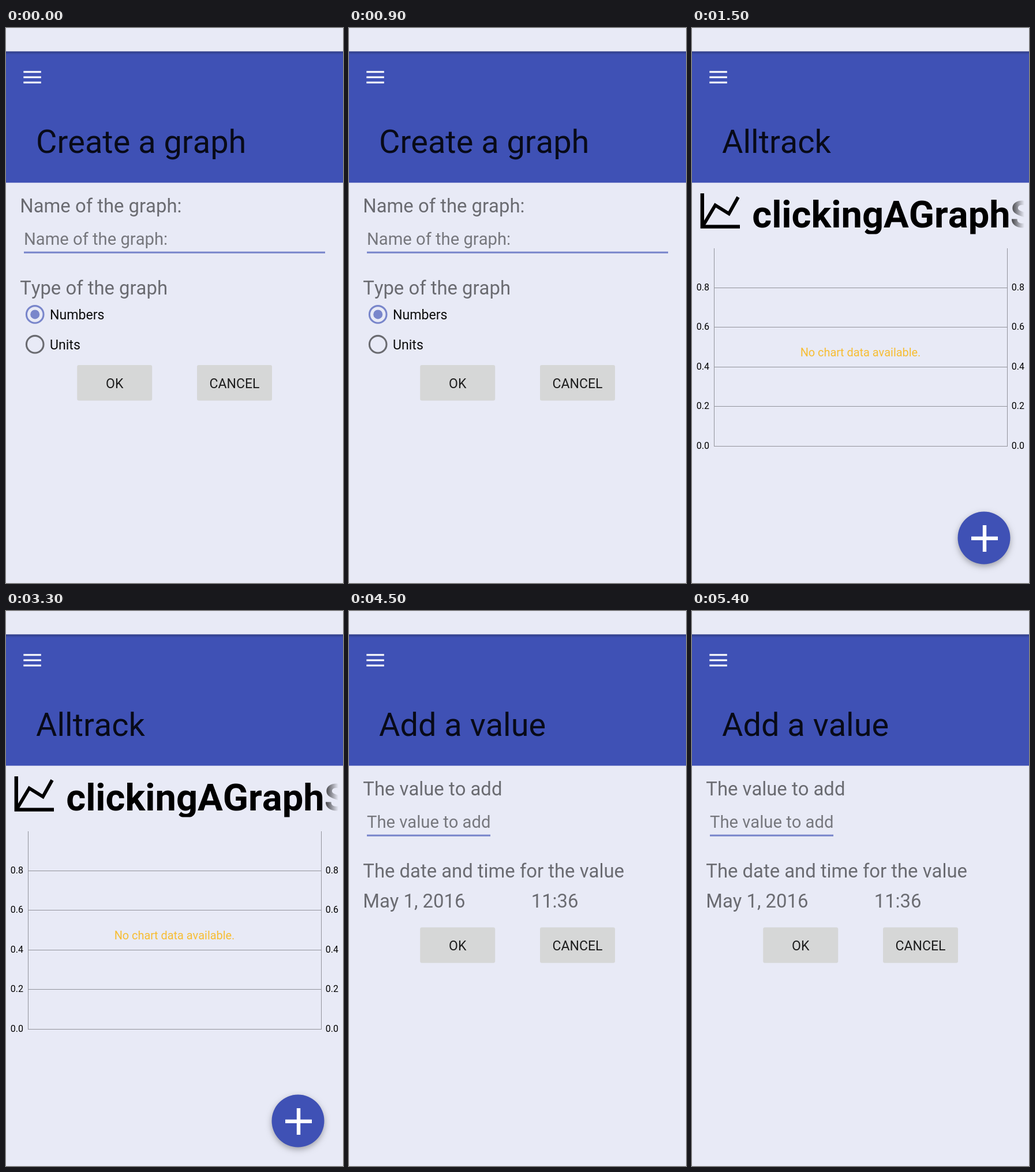
These frames come from a looping animation (584x960 px, 6 s). An HTML page with a canvas:

```html
<!DOCTYPE html>
<html lang="en">
<head>
<meta charset="utf-8">
<title>Graph tracker</title>
<style>
  html, body { margin: 0; width: 584px; height: 960px; overflow: hidden; background: #e8eaf6; }
  canvas { display: block; }
</style>
</head>
<body>
<canvas id="stage" width="584" height="960"></canvas>
<script>
const ctx = document.getElementById('stage').getContext('2d');
const LOOP = 6000;
const BACKGROUND = '#e8eaf6', PRIMARY = '#3f51b5', ACCENT = '#7986cb';
const STRONG = 'rgba(0,0,0,.87)', MUTED = 'rgba(0,0,0,.54)', HINT = 'rgba(0,0,0,.49)';

function rect(x, y, w, h, color) {
  ctx.fillStyle = color;
  ctx.fillRect(x, y, w, h);
}

function text(str, x, y, size, color, align = 'left', weight = 400) {
  ctx.font = `${weight} ${size}px Roboto, sans-serif`;
  ctx.fontKerning = 'none';
  ctx.textAlign = align;
  ctx.fillStyle = color;
  ctx.fillText(str, x, y);
}

function disc(x, y, r, color) {
  ctx.beginPath();
  ctx.arc(x, y, r, 0, Math.PI * 2);
  ctx.fillStyle = color;
  ctx.fill();
}

function polyline(points, width, color) {
  ctx.beginPath();
  points.forEach(([x, y]) => ctx.lineTo(x, y));
  ctx.lineWidth = width;
  ctx.strokeStyle = color;
  ctx.stroke();
}

function header(title) {
  rect(0, 0, 584, 960, BACKGROUND);
  rect(0, 40.5, 584, 227.1, PRIMARY);
  const shade = ctx.createLinearGradient(0, 40, 0, 46);
  shade.addColorStop(0, 'rgba(0,0,0,.3)');
  shade.addColorStop(1, 'rgba(0,0,0,0)');
  rect(0, 40.5, 584, 6, shade);
  for (const y of [74.4, 83.6, 92.7]) rect(30.3, y, 30.5, 3.1, '#fff');
  text(title, 52, 216, 55.9, STRONG);
}

function label(str, x, y) {
  text(str, x, y, 32.85, MUTED);
}

function input(hint, right) {
  text(hint, 31, 375, 29.2, HINT);
  rect(31, 386.7, right - 31, 3.1, ACCENT);
}

function radio(str, y, checked) {
  const color = checked ? ACCENT : MUTED;
  ctx.beginPath();
  ctx.arc(50.2, y, 14.8, 0, Math.PI * 2);
  ctx.lineWidth = 3.1;
  ctx.strokeStyle = color;
  ctx.stroke();
  if (checked) disc(50.2, y, 8, color);
  text(str, 76, y + 8.7, 23.1, 'rgba(0,0,0,.95)');
}

function button(str, x, y) {
  ctx.beginPath();
  ctx.roundRect(x, y, 130, 61.5, 3);
  ctx.fillStyle = '#d6d7d7';
  ctx.fill();
  text(str, x + 65, y + 40, 23, STRONG, 'center');
}

function buttons(y) {
  button('OK', 123.2, y);
  button('CANCEL', 331, y);
}

function createScreen() {
  header('Create a graph');
  label('Name of the graph:', 24.3, 319);
  input('Name of the graph:', 553);
  label('Type of the graph', 24.3, 461);
  radio('Numbers', 495.4, true);
  radio('Units', 547.2, false);
  buttons(583);
}

function graphTitle() {
  polyline([[17.8, 286], [17.8, 343.6], [83, 343.6]], 6.4, '#000');
  polyline([[18.5, 343], [40.3, 306.5], [64, 321.2], [80, 292.5]], 5.8, '#000');
  ctx.save();
  ctx.beginPath();
  ctx.rect(100, 280, 476, 76.5);
  ctx.clip();
  const fade = ctx.createLinearGradient(545, 0, 576, 0);
  fade.addColorStop(0, '#000');
  fade.addColorStop(1, 'rgba(0,0,0,0)');
  text('clickingAGraphS', 104.2, 345, 65, fade, 'left', 700);
  ctx.restore();
}

function chart() {
  const gray = '#92939b';
  for (let i = 0; i < 5; i++) {
    const y = Math.floor(723.2 - i * 68.45);
    const value = (i * 0.2).toFixed(1);
    rect(38, y, 509, 1, gray);
    text(value, 30, y + 5, 16, '#000', 'right');
    text(value, 553.7, y + 5, 16, '#000');
  }
  rect(38, 381, 1, 343, gray);
  rect(546, 381, 1, 343, gray);
  text('No chart data available.', 292, 568, 19.9, '#f7bd33', 'center');
}

function addButton() {
  ctx.save();
  ctx.shadowColor = 'rgba(0,0,0,.32)';
  ctx.shadowBlur = 11;
  ctx.shadowOffsetY = 4;
  disc(506, 882, 45.5, PRIMARY);
  ctx.restore();
  rect(484, 879.6, 46, 6.4, '#fff');
  rect(503.8, 860, 6.4, 46, '#fff');
}

function graphScreen() {
  header('Alltrack');
  graphTitle();
  chart();
  addButton();
}

function valueScreen() {
  header('Add a value');
  label('The value to add', 24.3, 319);
  input('The value to add', 245);
  label('The date and time for the value', 24.3, 461);
  label('May 1, 2016', 24.3, 513);
  label('11:36', 315.7, 513);
  buttons(547.2);
}

const start = performance.now();
function render() {
  const t = (performance.now() - start) % LOOP;
  if (t < 1500) createScreen();
  else if (t < 4500) graphScreen();
  else valueScreen();
  requestAnimationFrame(render);
}
render();
</script>
</body>
</html>
```
